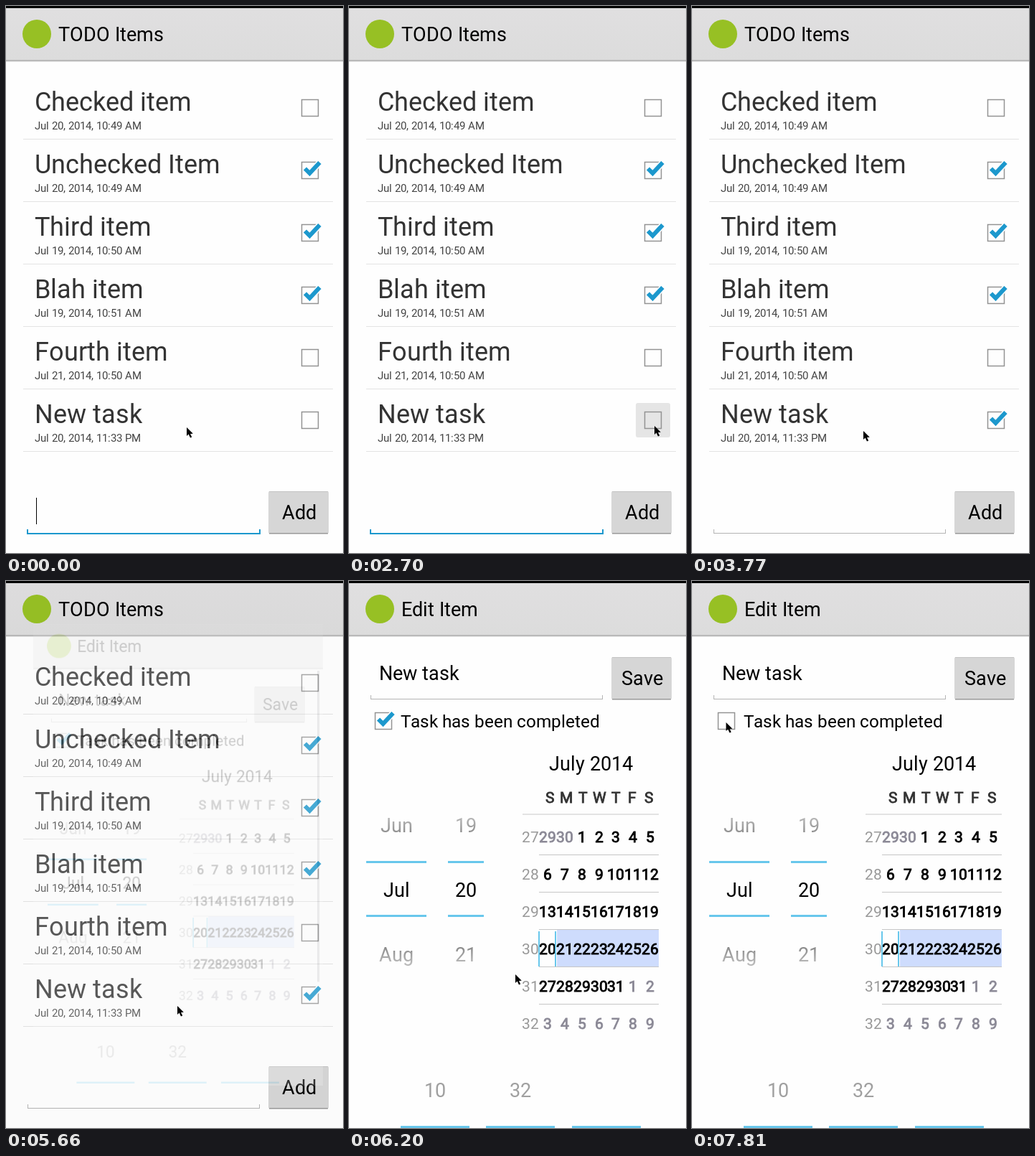
Animation of 470x762 px, one loop 8 s. Source, as an HTML page with a canvas:

```html
<!DOCTYPE html>
<html lang="en">
<head>
<meta charset="utf-8">
<title>TODO Items</title>
<style>
html, body { margin: 0; width: 100%; height: 100%; overflow: hidden; background: #fefefe; }
canvas { display: block; width: 100%; height: 100%; }
</style>
</head>
<body>
<canvas id="stage" width="470" height="762"></canvas>
<script>
const LOOP = 8000, W = 470, H = 762;
const FONT = 'Roboto, "Noto Sans", sans-serif';
const BLUE = '#1c98cd', PICKER = '#68c7ec';
const stage = document.getElementById('stage').getContext('2d');
const layer = document.createElement('canvas');
layer.width = 480;
layer.height = 765;
const sheet = layer.getContext('2d');

const items = [
  ['Checked item', 'Jul 20, 2014, 10:49 AM', false],
  ['Unchecked Item', 'Jul 20, 2014, 10:49 AM', true],
  ['Third item', 'Jul 19, 2014, 10:50 AM', true],
  ['Blah item', 'Jul 19, 2014, 10:51 AM', true],
  ['Fourth item', 'Jul 21, 2014, 10:50 AM', false],
  ['New task', 'Jul 20, 2014, 11:33 PM', false]
];

// Each step: start time and the values that change then.
const steps = [
  [0, { x: 252, y: 587, caret: true, focus: true, done: false }],
  [270, { x: 408, y: 585 }],
  [540, { x: 426, caret: false }],
  [1080, { caret: true, done: true }],
  [1620, { caret: false }],
  [2160, { caret: true, done: false }],
  [2700, { caret: false, boxDown: true }],
  [2970, { x: 369, boxDown: false, done: true }],
  [3240, { x: 239, y: 592, caret: true }],
  [3500, { rowDown: true }],
  [3770, { rowDown: false, caret: false, focus: false }],
  [5660, { edit: 0.19, scale: 0.843, dim: 0.012 }],
  [5930, { edit: 0.45, scale: 0.89, dim: 0.08 }],
  [6200, { edit: 1, scale: 1, dim: 0, x: 232, y: 548 }],
  [6470, { x: 182, y: 280 }],
  [6740, { x: 89, y: 203 }],
  [7010, { x: 57, y: 197 }],
  [7280, { x: 47.5 }],
  [7810, { done: false }]
];

function stateAt(t) {
  const s = { edit: 0 };
  for (const [start, change] of steps) if (start <= t) Object.assign(s, change);
  return s;
}

function rect(c, x, y, w, h, color) {
  c.fillStyle = color;
  c.fillRect(x, y, w, h);
}

// Glyphs advance by whole pixels without kerning; bold is a thin outline.
function text(c, str, x, y, size, color, { center = false, bold = false } = {}) {
  c.font = `${size}px ${FONT}`;
  c.fillStyle = c.strokeStyle = color;
  c.lineWidth = size / 24;
  const glyphs = [...String(str)];
  const widths = glyphs.map(g => Math.round(c.measureText(g).width));
  if (center) x = Math.round(x - widths.reduce((a, b) => a + b) / 2);
  glyphs.forEach((g, i) => {
    c.fillText(g, x, y);
    if (bold) c.strokeText(g, x, y);
    x += widths[i];
  });
}

function path(c, points, close) {
  c.beginPath();
  points.forEach(([x, y]) => c.lineTo(x, y));
  if (close) c.closePath();
}

function shade(c, y0, y1, from, to) {
  const g = c.createLinearGradient(0, y0, 0, y1);
  g.addColorStop(0, from);
  g.addColorStop(1, to);
  return g;
}

function header(c, title) {
  const w = c.canvas.width;
  rect(c, 0, 0, w, c.canvas.height, '#fefefe');
  rect(c, 0, 3, w, 73, shade(c, 3, 76, '#e0dfe0', '#dcdcdc'));
  rect(c, 0, 75, w, 2, '#b9b9b9');
  rect(c, 0, 77, w, 1, '#e6e6e6');
  c.fillStyle = '#97c024';
  c.beginPath();
  c.arc(43, 39, 20, 0, Math.PI * 2);
  c.fill();
  text(c, title, 73, 49, 27, '#000');
}

function checkbox(c, x, y, on) {
  c.lineWidth = 1.5;
  c.strokeStyle = '#939393';
  c.strokeRect(x - 11.5, y - 11.5, 23, 23);
  if (!on) return;
  path(c, [[x - 7, y - 2.5], [x - 0.5, y + 4], [x + 13.5, y - 11]]);
  c.lineWidth = 9;
  c.strokeStyle = '#fefefe';
  c.stroke();
  c.lineWidth = 6;
  c.strokeStyle = BLUE;
  c.stroke();
}

function button(c, y, label) {
  c.fillStyle = '#d6d6d6';
  c.beginPath();
  c.roundRect(366, y, 84, 59, 2);
  c.fill();
  rect(c, 367, y, 82, 1, '#c4c4c4');
  rect(c, 367, y + 58, 82, 1.5, '#999');
  text(c, label, 408.5, y + 39, 27, '#000', { center: true });
}

function field(c, y, focus) {
  const color = focus ? BLUE : '#b4b4b4';
  const x = focus ? 29 : 30, w = focus ? 326 : 324, line = focus ? 2 : 1;
  rect(c, x, y, w, line, color);
  rect(c, x, y - 5, line, 5, color);
  rect(c, x + w - line, y - 5, line, 5, color);
}

function drawList(c, s) {
  header(c, 'TODO Items');
  if (s.rowDown) rect(c, 24, 534, 432, 86, '#e4e4e4');
  if (s.boxDown) {
    c.fillStyle = '#e5e5e5';
    c.beginPath();
    c.roundRect(400, 553, 48, 48, 3);
    c.fill();
  }
  items.forEach(([name, date, on], i) => {
    const y = i * 87;
    text(c, name, 40, y + 146, 36, '#333');
    text(c, date, 40, y + 172, 15, '#444');
    checkbox(c, 424, y + 142, i === 5 ? s.done : on);
    rect(c, 24, y + 185, 432, 1, '#e3e3e3');
  });
  field(c, 734, s.focus);
  if (s.caret) rect(c, 42, 685, 1, 37, '#000');
  button(c, 676, 'Add');
}

function drawPicker(c, x, w, values) {
  const center = { center: true };
  text(c, values[0], x, 349.5, 27, shade(c, 329, 352, '#b8b8b8', '#8c8c8c'), center);
  text(c, values[1], x, 439.5, 27, '#000', center);
  text(c, values[2], x, 529.5, 27, shade(c, 508, 532, '#858585', '#b8b8b8'), center);
  for (const y of [390, 465]) rect(c, x - w / 2, y, w, 3, PICKER);
}

function drawCalendar(c) {
  const cell = 167 / 7, center = { center: true }, strong = { center: true, bold: true };
  text(c, 'July 2014', 337, 263.5, 27, '#000', center);
  [...'SMTWTFS'].forEach((d, i) => text(c, d, 280 + i * 23, 309, 21, '#333', strong));
  rect(c, 242, 324.5, 190, 1, '#cacaca');
  rect(c, 290, 486, 142, 51, '#cedcfd');
  for (let row = 0; row < 6; row++) {
    const y = 364 + row * 52;
    text(c, 27 + row, 253, y, 21, '#999', center);
    if (row < 5) rect(c, 265, y + 17, 167, 1, '#c6c6c6');
    for (let col = 0; col < 7; col++) {
      const day = new Date(2014, 5, 29 + row * 7 + col);
      const color = day.getMonth() === 6 ? '#000' : '#8b8996';
      text(c, day.getDate(), 265 + cell * (col + 0.5), y, 21, color, strong);
    }
  }
  for (const x of [264, 287]) rect(c, x, 488, 2, 49, PICKER);
}

function drawEdit(c, s) {
  header(c, 'Edit Item');
  text(c, 'New task', 42, 138, 27, '#000');
  field(c, 164, false);
  button(c, 106, 'Save');
  checkbox(c, 48, 195, s.done);
  text(c, 'Task has been completed', 72, 204, 24.3, '#000');
  drawPicker(c, 66, 84, ['Jun', 'Jul', 'Aug']);
  drawPicker(c, 163, 50, ['19', '20', '21']);
  drawCalendar(c);
  text(c, '10', 120, 718.5, 27, '#a0a0a0', { center: true });
  text(c, '32', 239, 718.5, 27, '#a0a0a0', { center: true });
  for (const x of [72, 191, 311]) rect(c, x, 759, 96, 3, PICKER);
  rect(c, 470, 80, 4, 514, '#a5a2a8');
}

function drawCursor(c, x, y) {
  path(c, [[0, 0], [0, 12], [2.6, 9.6], [5, 14.5], [7.2, 13.5], [5, 9], [8.8, 8.8]]
    .map(([dx, dy]) => [x + dx, y + dy]), true);
  c.fillStyle = '#000';
  c.fill();
}

function draw(t) {
  const s = stateAt(t), c = stage;
  if (s.edit < 1) drawList(c, s);
  if (s.edit) {
    rect(c, 0, 0, W, H, `rgba(0, 0, 10, ${s.dim})`);
    drawEdit(sheet, s);
    // The window grows around its own centre; its top edge sits below the black strip.
    c.save();
    c.globalAlpha = s.edit;
    c.translate(240, 367);
    c.scale(s.scale, s.scale);
    c.drawImage(layer, 0, 3, 480, 762, -240, -364, 480, 762);
    c.restore();
  }
  rect(c, 0, 0, W, 3, '#000');
  drawCursor(c, s.x, s.y);
}

function tick() {
  draw(performance.now() % LOOP);
  requestAnimationFrame(tick);
}
tick();
</script>
</body>
</html>
```
